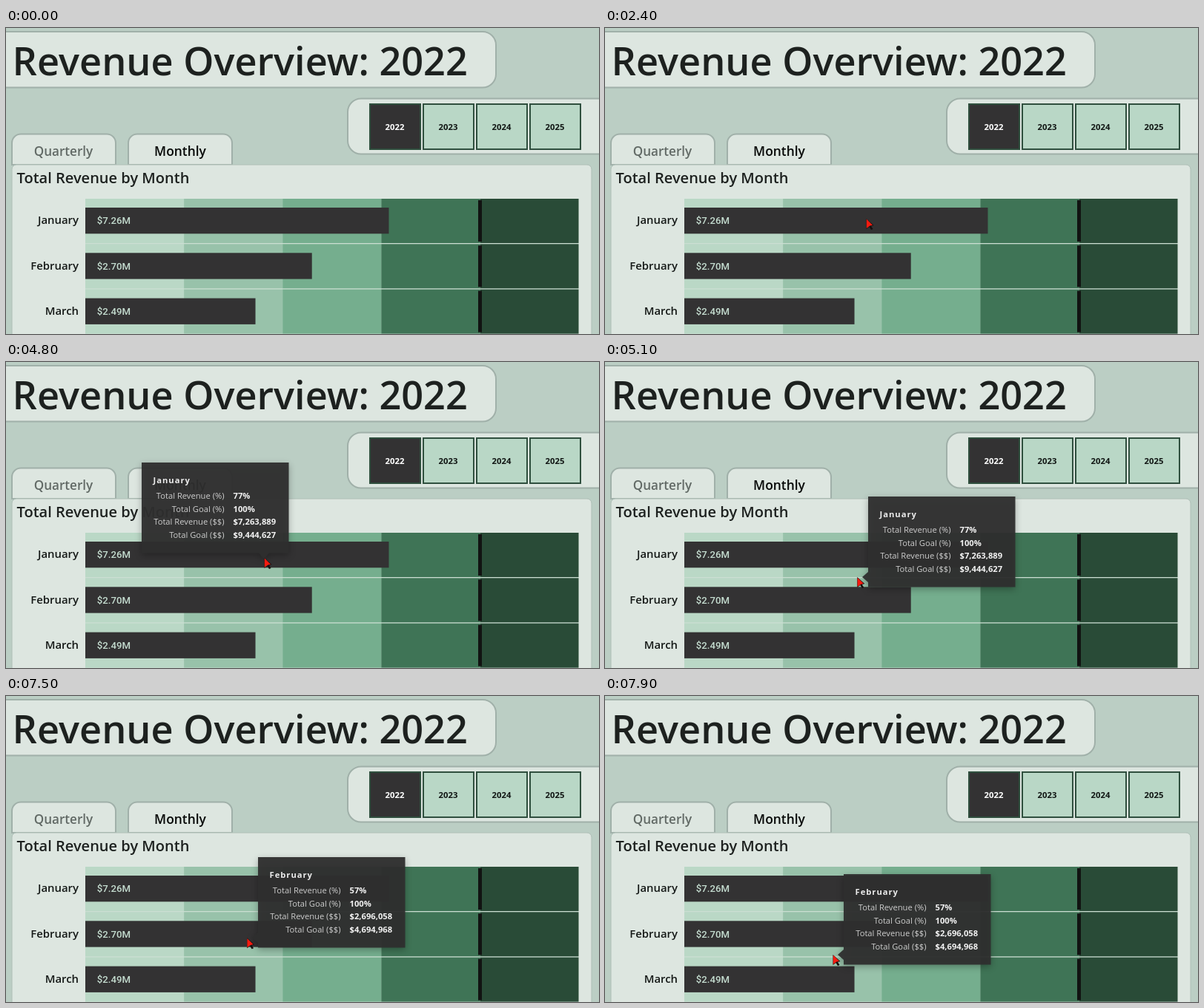
An HTML page with a canvas for the animation above (8 s loop, 800 px wide and 414 px high).

```html
<!DOCTYPE html>
<html lang="en">
<head>
<meta charset="utf-8">
<title>Revenue Overview</title>
<style>
html, body { margin: 0; width: 100%; height: 100%; overflow: hidden; background: #bbcec4; }
canvas { display: block; width: 800px; height: 414px; }
</style>
</head>
<body>
<canvas id="stage"></canvas>
<script>
const W = 800, H = 414, LOOP = 8000, STEP = 100;
const canvas = document.getElementById('stage');
const ctx = canvas.getContext('2d');
const ratio = window.devicePixelRatio || 1;
canvas.width = W * ratio;
canvas.height = H * ratio;

const SANS = '"Open Sans", "Noto Sans", sans-serif';
const DIN = 'Roboto, Inter, sans-serif';
const PANEL = '#dde6e0', EDGE = '#a0b0a9', DARK = '#333233', INK = '#1d211f';
const BANDS = ['#bad8c6', '#98c2aa', '#75ae8e', '#3f7456', '#294b37'];
const CHART = { x: 107, y: 231, band: 133.1, pitch: 61.3, h: 60 };

const MONTHS = [
  { name: 'January', revenue: 7263889, goal: 9444627 },
  { name: 'February', revenue: 2696058, goal: 4694968 },
  { name: 'March', revenue: 2490000, goal: 5776000 }
];

const START = { x: 765, y: 31 };
const MOVES = [
  { from: 1400, to: 2200, x: 620, y: 107 },
  { from: 2200, to: 2400, x: 352, y: 257 },
  { from: 2700, to: 2900, x: 348, y: 264 },
  { from: 4800, to: 5600, x: 331, y: 318 },
  { from: 7400, to: 7900, x: 307, y: 349 }
];

const clamp = v => Math.min(1, Math.max(0, v));
const easeOut = k => 1 - Math.pow(1 - k, 1.4);
const dollars = n => '$' + n.toLocaleString('en-US');
const millions = n => '$' + (n / 1e6).toFixed(2) + 'M';

function pointerAt(t) {
  return MOVES.reduce((p, m) => {
    const k = easeOut(clamp((t - m.from) / (m.to - m.from)));
    return { x: p.x + (m.x - p.x) * k, y: p.y + (m.y - p.y) * k };
  }, START);
}

function rect(x, y, w, h, fill) {
  ctx.fillStyle = fill;
  ctx.fillRect(x, y, w, h);
}

function panel(x, y, w, h, radii, edge = EDGE, line = 2) {
  ctx.beginPath();
  ctx.roundRect(x, y, w, h, radii);
  ctx.fillStyle = PANEL;
  ctx.fill();
  ctx.strokeStyle = edge;
  ctx.lineWidth = line;
  ctx.stroke();
}

function text(str, x, y, size, weight, color, align = 'left', family = SANS) {
  ctx.font = `${weight} ${size}px ${family}`;
  ctx.textAlign = align;
  ctx.fillStyle = color;
  ctx.fillText(str, x, y);
}

function polygon(points, fill) {
  ctx.beginPath();
  points.forEach(([x, y]) => ctx.lineTo(x, y));
  ctx.closePath();
  ctx.fillStyle = fill;
  ctx.fill();
}

function drawHeader() {
  panel(-20, 5, 681, 75.5, [0, 18, 18, 0]);
  text('Revenue Overview: 2022', 8.5, 64, 52.3, 600, INK);

  panel(461, 95.5, 360, 75, [18, 0, 0, 18]);
  for (let i = 0; i < 4; i++) {
    const x = 490 + i * 72, on = i === 0;
    rect(x, 102, 70, 63, '#2f4f3e');
    rect(x + 2, 104, 66, 59, on ? DARK : '#b9d7c6');
    text(2022 + i, x + 34.5, 137.5, 11.3, 700, on ? '#ffffff' : '#111614', 'center');
  }
}

function drawTabs() {
  panel(8, 143.5, 140, 41.5, [12, 12, 0, 0]);
  panel(165, 143.5, 140, 41.5, [12, 12, 0, 0]);
  panel(8, 185, 782, 250, 6, '#aebeb6', 1);
  text('Quarterly', 77.5, 173, 17.1, 600, '#626a66', 'center');
  text('Monthly', 235, 173, 17.4, 600, '#060807', 'center');
}

function drawChart() {
  const { x, y, band, pitch, h } = CHART;
  text('Total Revenue by Month', 14.5, 210, 20.05, 600, INK);
  rect(x, y, band * 5, pitch * 2 + h, '#cbded2');
  MONTHS.forEach((m, i) => {
    const top = y + i * pitch;
    BANDS.forEach((color, k) => rect(x + k * band, top, band, h, color));
    rect(637, top + 2, 5, h - 4, '#111312');
    // The goal sits at the end of the fourth band
    rect(x, top + 12, m.revenue / m.goal * band * 4, 35.3, DARK);
    text(m.name, 98, top + 34.2, 14.9, 600, '#141816', 'right');
    text(millions(m.revenue), 122.8, top + 34.2, 13.2, 500, '#c5ddd0', 'left', DIN);
  });
}

function drawTip(x, y, month, side, alpha) {
  const w = 198.5, h = 122.5;
  ctx.save();
  ctx.translate(Math.round(x), Math.round(y));
  ctx.globalAlpha = alpha;
  ctx.shadowColor = 'rgba(0,0,0,0.3)';
  ctx.shadowBlur = 10 * ratio;
  ctx.shadowOffsetY = 3 * ratio;
  const tail = side
    ? [[0, h], [0, 116], [-8, 109], [0, 102]]
    : [[172, h], [165, h + 8], [158, h], [0, h]];
  polygon([[0, 0], [w, 0], [w, h], ...tail], 'rgba(47,47,47,0.95)');
  ctx.shadowColor = 'transparent';

  ctx.letterSpacing = '1px';
  text(month.name, 15.5, 28, 11.2, 700, '#ececec');
  ctx.letterSpacing = '0px';
  const lines = {
    'Total Revenue (%)': Math.round(100 * month.revenue / month.goal) + '%',
    'Total Goal (%)': '100%',
    'Total Revenue ($$)': dollars(month.revenue),
    'Total Goal ($$)': dollars(month.goal)
  };
  Object.entries(lines).forEach(([label, value], i) => {
    const base = 48.7 + i * 17.8;
    text(label, 111.5, base, 11.2, 400, '#cdcdcd', 'right');
    text(value, 123.5, base, 11.2, 700, '#f2f2f2');
  });
  ctx.restore();
}

function drawPointer({ x, y }) {
  ctx.save();
  ctx.translate(x, y + 1);
  polygon([[0.5, 0], [10.5, 9], [7, 10], [9.5, 14], [7, 15], [4.5, 11], [0.5, 14]], '#161010');
  polygon([[0.8, 0.6], [9, 8.7], [5.5, 9.6], [0.8, 13]], '#f51b10');
  ctx.restore();
}

function draw(t) {
  ctx.setTransform(ratio, 0, 0, ratio, 0, 0);
  rect(0, 0, W, H, '#bbcec4');
  drawHeader();
  drawTabs();
  drawChart();
  const p = pointerAt(t);
  if (t >= 2800) {
    const side = t >= 4900;
    const dx = side ? 15 : -165, dy = side ? -108.4 : -128;
    const month = MONTHS[t < 5300 ? 0 : 1];
    drawTip(p.x + dx, p.y + dy, month, side, clamp((t - 2700) / 500));
  }
  if (t >= 1400) drawPointer(p);
}

const start = performance.now();
function tick() {
  const t = (performance.now() - start) % LOOP;
  draw(Math.floor(t / STEP) * STEP);
  requestAnimationFrame(tick);
}
tick();
</script>
</body>
</html>
```
